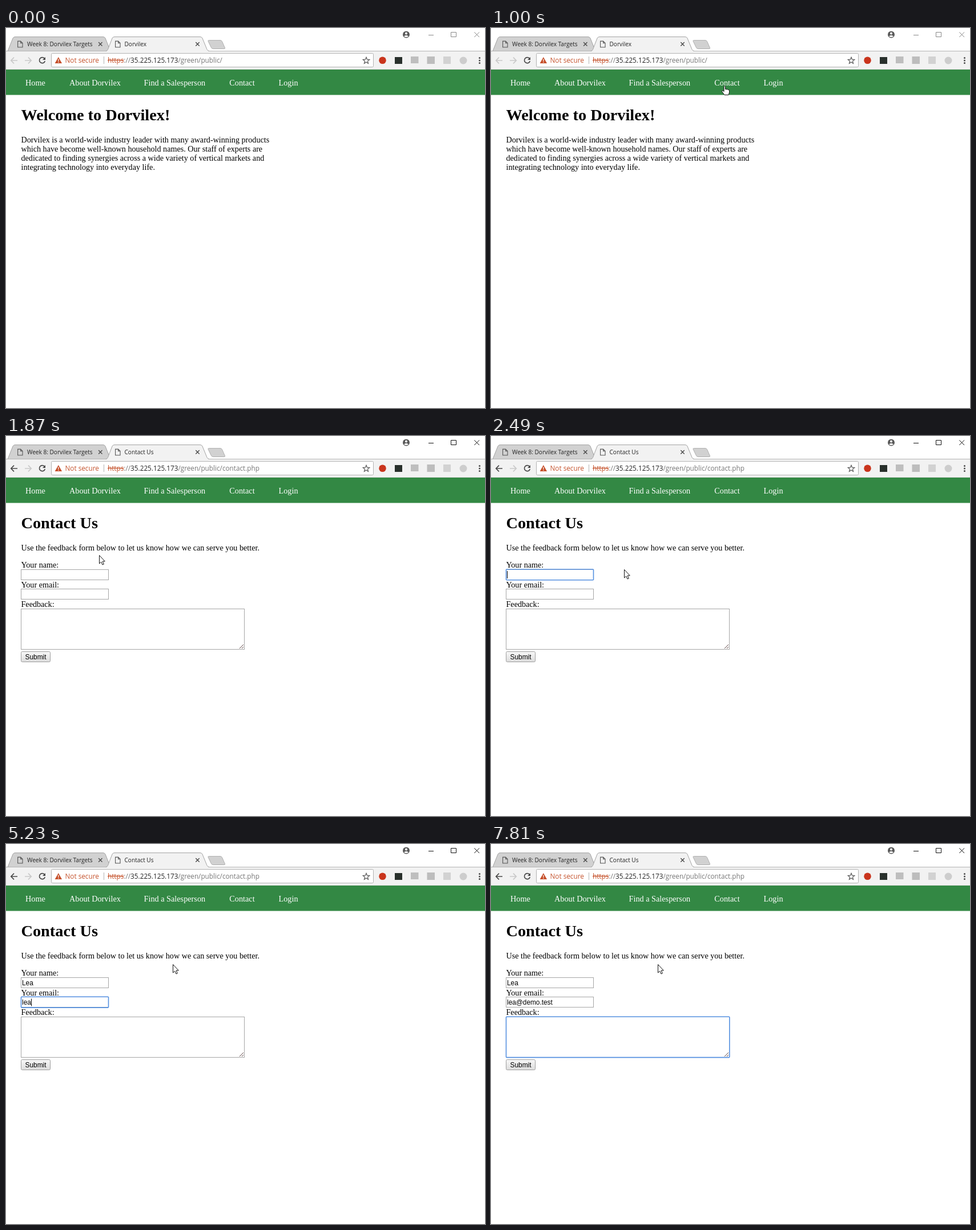
Animation, 839 px wide and 667 px high, one loop 8000 ms. Source, as an HTML page:

```html
<!DOCTYPE html>
<html lang="en">
<head>
<meta charset="utf-8">
<title>Contact form</title>
<style>
html, body { margin: 0; width: 100%; height: 100%; overflow: hidden; background: #fff; }
svg { display: block; width: 839px; height: 667px; }
text { white-space: pre; }
.ui { font: 11.75px "Open Sans", "Noto Sans", sans-serif; }
.tab { font-size: 10.1px; }
.page { font: 14.15px "Liberation Serif", "Times New Roman", serif; }
.nav { font-size: 14.25px; fill: #fff; }
.h1 { font-size: 28.3px; font-weight: bold; }
.field { font: 11.85px "Liberation Sans", Arial, sans-serif; }
.line { fill: none; stroke: #555; }
.box { fill: #fff; stroke: #a6a6a6; }
.cursor { fill: #fff; stroke: #111; stroke-linejoin: round; }
</style>
</head>
<body>
<svg viewBox="0 0 839 667">
  <defs>
    <linearGradient id="fade" gradientUnits="userSpaceOnUse" x1="306" x2="325" y1="0" y2="0">
      <stop stop-color="#222"/><stop offset="1" stop-color="#222" stop-opacity="0"/>
    </linearGradient>
    <linearGradient id="button" x2="0" y2="1">
      <stop stop-color="#f8f8f8"/><stop offset="1" stop-color="#dcdcdc"/>
    </linearGradient>
    <g id="file" class="line" stroke-width="1.1">
      <path d="M.6 .6H5.6L9 4V11.2H.6ZM5.6 .6V4H9"/>
    </g>
    <path id="cross" d="M-3.2 -3.2L3.2 3.2M3.2 -3.2L-3.2 3.2" fill="none" stroke="#4a4a4a" stroke-width="1.4"/>
    <path id="arrow" d="M12 0H.8M6 -5.4L.8 0L6 5.4" fill="none" stroke-width="1.7"/>
  </defs>
  <rect width="839" height="667" fill="#fff"/>

  <!-- tab strip -->
  <g class="ui tab" fill="#222">
    <path d="M3 40.5L12 18Q13 15.5 16 15.5H170Q173 15.5 174 18L183 40.5Z" fill="#d1d1d1" stroke="#a3a3a3"/>
    <path d="M0 40.5H839" stroke="#b4b4b4"/>
    <path d="M0 41H839V73H0Z" fill="#f2f2f2"/>
    <path d="M175 41Q177.500 40 178.500 37.500L186 18Q187 15.500 190 15.500H340Q343 15.500 344 18L352 37.500Q353 40 356 41Z" fill="#f2f2f2"/>
    <path d="M175 40.500Q177.500 40 178.500 37.500L186 18Q187 15.500 190 15.500H340Q343 15.500 344 18L352 37.500Q353 40 356 40.500" fill="none" stroke="#a3a3a3"/>
    <path d="M355.500 21.500H375Q377.500 21.500 378.500 23.500L383.500 35Q384 36.500 382 36.500H363Q360.500 36.500 359.500 34.500L354 23Q353.500 21.500 355.500 21.500Z" fill="#d1d1d1" stroke="#b0b0b0"/>
    <use href="#file" x="20" y="22.500"/>
    <text x="37" y="32">Week 8: Dorvilex Targets</text>
    <use href="#cross" x="165.300" y="28.300"/>
    <use href="#file" id="icon" x="191" y="22.500"/>
    <path id="spin" class="line" d="M191.700 25.500A5 5 0 0 1 201 28" stroke-width="1.500"/>
    <text id="title" x="207.500" y="32" fill="url(#fade)"></text>
    <use href="#cross" x="335.500" y="28.300"/>
  </g>

  <!-- window buttons -->
  <circle cx="701" cy="11.500" r="6" fill="#595959"/>
  <g fill="#fff"><circle cx="701" cy="9.600" r="2"/><path d="M697 14.700Q701 10.800 705 14.700Q701 17.500 697 14.700Z"/></g>
  <path id="win" fill="none" d="M740 12.500H749M779.500 7.500H788.500V15.500H779.500ZM820.300 7.300L829 16M829 7.300L820.300 16"/>

  <!-- toolbar -->
  <path d="M0 72.500H839" stroke="#d5d9d5"/>
  <g class="ui">
    <use href="#arrow" id="back" x="8" y="57"/>
    <use href="#arrow" transform="translate(45 57) scale(-1 1)" stroke="#c9c9c9"/>
    <g id="reload">
      <path d="M67.300 53.400A5 5 0 1 0 68.300 58" fill="none" stroke="#4a4a4a" stroke-width="1.700"/>
      <path d="M69 51V56H64Z" fill="#4a4a4a"/>
    </g>
    <path id="stop" d="M59 52.300L68.500 61.800M68.500 52.300L59 61.800" fill="none" stroke="#4a4a4a" stroke-width="1.600"/>
    <rect x="79.500" y="44.500" width="564" height="24" rx="2" fill="#fff" stroke="#b2b2b2"/>
    <path d="M91.800 51L98 62H85.600Z" fill="#c64f2a"/>
    <path d="M91.800 54.500V58.300M91.800 59.300V60.700" stroke="#fff" stroke-width="1.300"/>
    <text x="103.500" y="61" fill="#c5532d">Not secure</text>
    <path d="M171.500 50V63" stroke="#b5b5b5"/>
    <text x="178" y="61" fill="#777"><tspan fill="#c5532d" text-decoration="line-through">https</tspan>://<tspan fill="#222">35.225.125.173</tspan><tspan id="path"></tspan></text>
    <path id="star" class="line" stroke-width="1.200"/>
    <circle cx="659.500" cy="56.700" r="6.300" fill="#c9341c"/>
    <rect x="681" y="51" width="13" height="12" fill="#29302c"/>
    <rect x="709" y="50" width="13.500" height="12" fill="#bebebe"/>
    <rect x="737.500" y="50" width="13.500" height="13" fill="#bdbdbd"/>
    <rect x="766" y="50" width="13" height="13" fill="#d2d2d2"/>
    <circle cx="801" cy="57" r="6.500" fill="#cdcdcd"/>
    <g fill="#4a4a4a"><circle cx="829.500" cy="52.500" r="1.500"/><circle cx="829.500" cy="57" r="1.500"/><circle cx="829.500" cy="61.500" r="1.500"/></g>
  </g>

  <!-- site -->
  <g class="page">
    <rect y="73" width="839" height="44.500" fill="#338844"/>
    <g class="nav">
      <text x="34" y="101">Home</text>
      <text x="111" y="101">About Dorvilex</text>
      <text x="241.500" y="101">Find a Salesperson</text>
      <text x="391.300" y="101">Contact</text>
      <text x="477.500" y="101">Login</text>
    </g>
    <g id="home">
      <text class="h1" x="26.500" y="162">Welcome to Dorvilex!</text>
      <text x="26.500" y="201">Dorvilex is a world-wide industry leader with many award-winning products</text>
      <text x="26.500" y="217">which have become well-known household names. Our staff of experts are</text>
      <text x="26.500" y="233">dedicated to finding synergies across a wide variety of vertical markets and</text>
      <text x="26.500" y="248.500">integrating technology into everyday life.</text>
    </g>
    <g id="contact">
      <text class="h1" x="26.500" y="162">Contact Us</text>
      <text x="26.500" y="201">Use the feedback form below to let us know how we can serve you better.</text>
      <text x="26.500" y="231">Your name:</text>
      <text x="26.500" y="265.500">Your email:</text>
      <text x="26.500" y="300">Feedback:</text>
      <rect class="box" x="26.500" y="234.500" width="153" height="18"/>
      <rect class="box" x="26.500" y="268.500" width="153" height="18"/>
      <rect class="box" x="26.500" y="303.500" width="391" height="71"/>
      <path d="M409 373L416 366M413 373L416 370" stroke="#5c4444"/>
      <rect id="ring" fill="none" stroke="#5590e0" stroke-width="1.600" rx="1"/>
      <rect x="26.500" y="378.500" width="51" height="18" rx="2" fill="url(#button)" stroke="#9f9f9f"/>
      <g class="field">
        <text x="52" y="391.500" text-anchor="middle">Submit</text>
        <text id="name" x="28" y="247.500"></text>
        <text id="mail" x="28" y="282"></text>
      </g>
      <path id="wave" fill="none" stroke="#e04a4a" stroke-width=".9"/>
      <rect id="caret" width="1" height="13"/>
    </g>
  </g>

  <g id="pointer">
    <path id="point" class="cursor" d="M.5 .5V15L3.700 12L6 17L8.300 16L6.100 11H10.300Z"/>
    <path id="beam" class="line" d="M-3 -7.500H-1Q0 -7.500 0 -6.500V6.500Q0 7.500 -1 7.500H-3M3 -7.500H1Q0 -7.500 0 -6.500M0 6.500Q0 7.500 1 7.500H3" style="stroke:#222"/>
    <path id="hand" class="cursor" d="M-1 9V1.500Q0 -.5 1.500 1.500V6.500Q3 5.500 4 7Q5.500 6 6.500 7.500Q8.500 7 8.500 9V12L7 16.500H0L-4.500 10.500Q-4.500 8 -2.500 9L-1 10.500Z"/>
  </g>
</svg>
<script>
const LOOP = 8000;
const CLICK = 1280, COMMIT = 1680, LOADED = 1850, FOCUS = 2240;
const NAME = "Lea", MAIL = "lea@demo.test";
const nameKeys = [3870, 4050, 4330];
const mailKeys = [5050, 5140, 5230, 5590, 6430, 6510, 6600, 6680, 6760, 6990, 7070, 7150, 7230];
const tabs = [FOCUS, 4530, 7300];
const keys = [...tabs, ...nameKeys, ...mailKeys];
const fields = [
  { x: 26.5, y: 234, w: 153, h: 18.8, caret: 237 },
  { x: 26.5, y: 268.3, w: 153, h: 18.8, caret: 271.5 },
  { x: 26.5, y: 303.3, w: 391.3, h: 71.3, caret: 306 }
];
const track = [
  [60, 737, 658], [200, 560, 480], [350, 340, 260], [460, 222, 180],
  [570, 249, 148], [700, 310, 128], [850, 385, 109], [900, 393, 106],
  [1000, 409, 101], [1280, 409, 101], [1450, 365, 122], [1740, 201, 184],
  [1900, 155, 215], [2080, 142, 238], [2240, 150, 243], [2370, 170, 243],
  [2490, 232, 234], [2570, 292, 211]
];

const $ = id => document.getElementById(id);
const set = (id, attrs) => {
  for (const k in attrs) $(id).setAttribute(k, attrs[k]);
};
const show = (id, on) => { $(id).style.display = on ? "" : "none"; };
const write = (id, s) => { if ($(id).textContent !== s) $(id).textContent = s; };
const past = (list, t) => list.filter(k => k <= t).length;

function pointerAt(t) {
  const i = track.findIndex(p => p[0] > t);
  if (i < 0) return track[track.length - 1].slice(1);
  if (i === 0) return track[0].slice(1);
  const [a, x, y] = track[i - 1], [b, u, v] = track[i];
  const k = (t - a) / (b - a);
  return [x + (u - x) * k, y + (v - y) * k];
}

function pointerKind(x, y, loaded) {
  const within = (l, r, top, bottom) => x > l && x < r && y > top && y < bottom;
  if (within(391, 437, 85, 109)) return "hand";
  const text = loaded
    ? within(26, 180, 234, 253)
    : within(26, 289, 137, 170) || within(26, 461, 187, 252);
  return text ? "beam" : "point";
}

function drawPointer(t) {
  const [x, y] = pointerAt(t);
  const kind = pointerKind(x, y, t >= LOADED);
  show("pointer", t >= 60);
  for (const id of ["point", "beam", "hand"]) show(id, id === kind);
  set("pointer", { transform: `translate(${Math.round(x)} ${Math.round(y)})` });
}

function drawBrowser(t) {
  const active = t >= CLICK, committed = t >= COMMIT, loaded = t >= LOADED;
  const loading = active && !loaded;
  set("win", { stroke: active ? "#111" : "#888" });
  set("back", { stroke: committed ? "#4a4a4a" : "#c9c9c9" });
  show("reload", !loading);
  show("stop", loading);
  show("icon", !loading);
  show("spin", loading);
  const turn = (t - 1740) * (committed ? .4 : -.25);
  set("spin", {
    transform: `rotate(${turn} 196 28)`,
    style: `stroke:${committed ? "#5c86c5" : "#8a8a8a"};display:${loading ? "inline" : "none"}`
  });
  write("title", loaded ? "Contact Us" : committed ? "https://35.225.125.173/green" : "Dorvilex");
  write("path", "/green/public/" + (committed ? "contact.php" : ""));
  show("home", !loaded);
  show("contact", loaded);
}

function drawForm(t) {
  write("name", NAME.slice(0, past(nameKeys, t)));
  write("mail", MAIL.slice(0, past(mailKeys, t)));
  const focus = past(tabs, t) - 1;
  show("ring", focus >= 0);
  show("caret", false);
  show("wave", focus === 1 && t >= mailKeys[3]);
  if (focus < 0) return;
  const f = fields[focus];
  set("ring", { x: f.x, y: f.y, width: f.w, height: f.h });
  const typed = focus < 2 ? $(["name", "mail"][focus]) : null;
  const width = typed && typed.textContent ? typed.getComputedTextLength() : 0;
  const last = Math.max(...keys.filter(k => k <= t));
  set("caret", { x: Math.round((focus === 2 ? 29 : 28) + width), y: f.caret });
  show("caret", Math.floor((t - last) / 510) % 2 === 0);
}

function star() {
  const pts = Array.from({ length: 10 }, (_, i) => {
    const a = i * Math.PI / 5 - Math.PI / 2, r = i % 2 ? 2.6 : 6;
    return `${(631 + r * Math.cos(a)).toFixed(2)} ${(57.3 + r * Math.sin(a)).toFixed(2)}`;
  });
  return `M${pts.join("L")}Z`;
}

function draw(t) {
  drawBrowser(t);
  drawForm(t);
  drawPointer(t);
}

set("star", { d: star() });
set("wave", { d: "M28 284" + "l2 -1.500l2 1.500".repeat(4) });

const start = performance.now();
function tick() {
  draw((performance.now() - start) % LOOP);
  requestAnimationFrame(tick);
}
tick();
</script>
</body>
</html>
```
